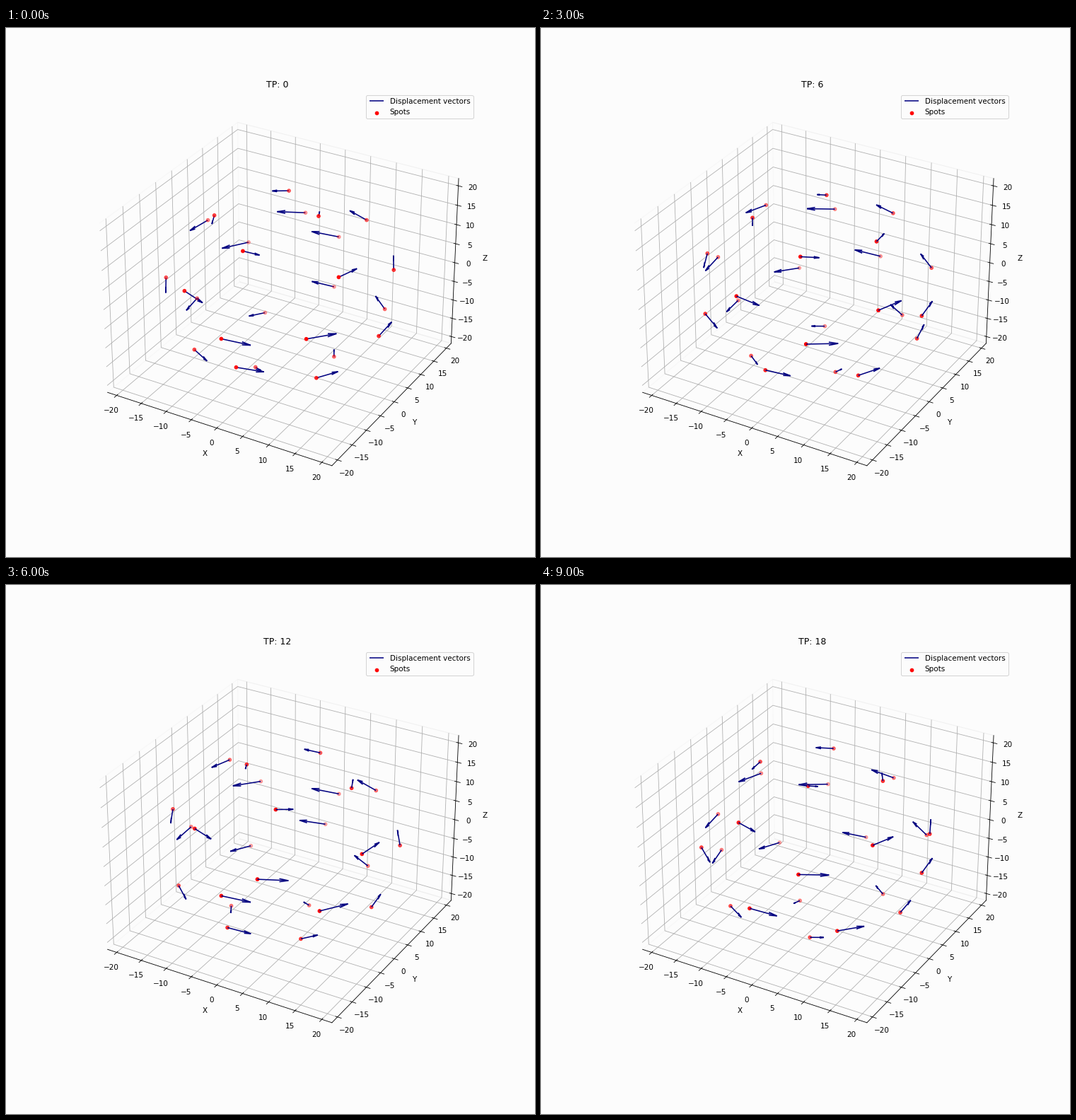
A matplotlib script for the animation above (9500 ms loop, 748 by 748 pixels).

```python
import numpy as np
import matplotlib.pyplot as plt
from matplotlib.animation import FuncAnimation

SIZE = 748
DPI = 74.8
FRAMES = 19
STEP = np.radians(15)
RADIUS = 20
COUNT = 25
LIMIT = 21.875
PAPER = "#fcfcfc"


def fibonacci_sphere(n, radius):
    """Evenly spread points, spiralling around the y axis."""
    i = np.arange(n)
    y = 1 - 2 * i / (n - 1)
    r = np.sqrt(np.clip(1 - y * y, 0, None))
    theta = np.pi * (3 - np.sqrt(5)) * i
    return radius * np.array([r * np.cos(theta), y, r * np.sin(theta)])


def rotate_z(points, angle):
    c, s = np.cos(angle), np.sin(angle)
    return np.array([[c, -s, 0], [s, c, 0], [0, 0, 1]]) @ points


points = fibonacci_sphere(COUNT, RADIUS)

fig = plt.figure(figsize=(SIZE / DPI, SIZE / DPI), dpi=DPI, facecolor=PAPER)
fig.subplots_adjust(left=0.125, right=0.9, bottom=0.125, top=0.88)
ax = fig.add_subplot(projection="3d", facecolor=PAPER)
ax.view_init(elev=30, azim=-60)

artists = []


def draw(tp):
    while artists:
        artists.pop().remove()
    start = rotate_z(points, tp * STEP)
    shift = rotate_z(points, (tp + 1) * STEP) - start
    artists.append(ax.quiver(*start, *shift, color="navy", label="Displacement vectors"))
    artists.append(ax.scatter(*start, color="red", label="Spots"))
    ax.set_title(f"TP: {tp}")
    return artists


draw(0)
ax.legend(loc="upper right", facecolor=PAPER)

ticks = np.arange(-20, 21, 5)
ax.set(xlabel="X", ylabel="Y", zlabel="Z", xticks=ticks, yticks=ticks, zticks=ticks)
ax.set(xlim=(-LIMIT, LIMIT), ylim=(-LIMIT, LIMIT), zlim=(-LIMIT, LIMIT))
for axis in (ax.xaxis, ax.yaxis, ax.zaxis):
    axis.pane.set_fill(False)

anim = FuncAnimation(fig, draw, frames=FRAMES, interval=500, repeat=True,
                     repeat_delay=0, blit=False)
plt.show()
```
